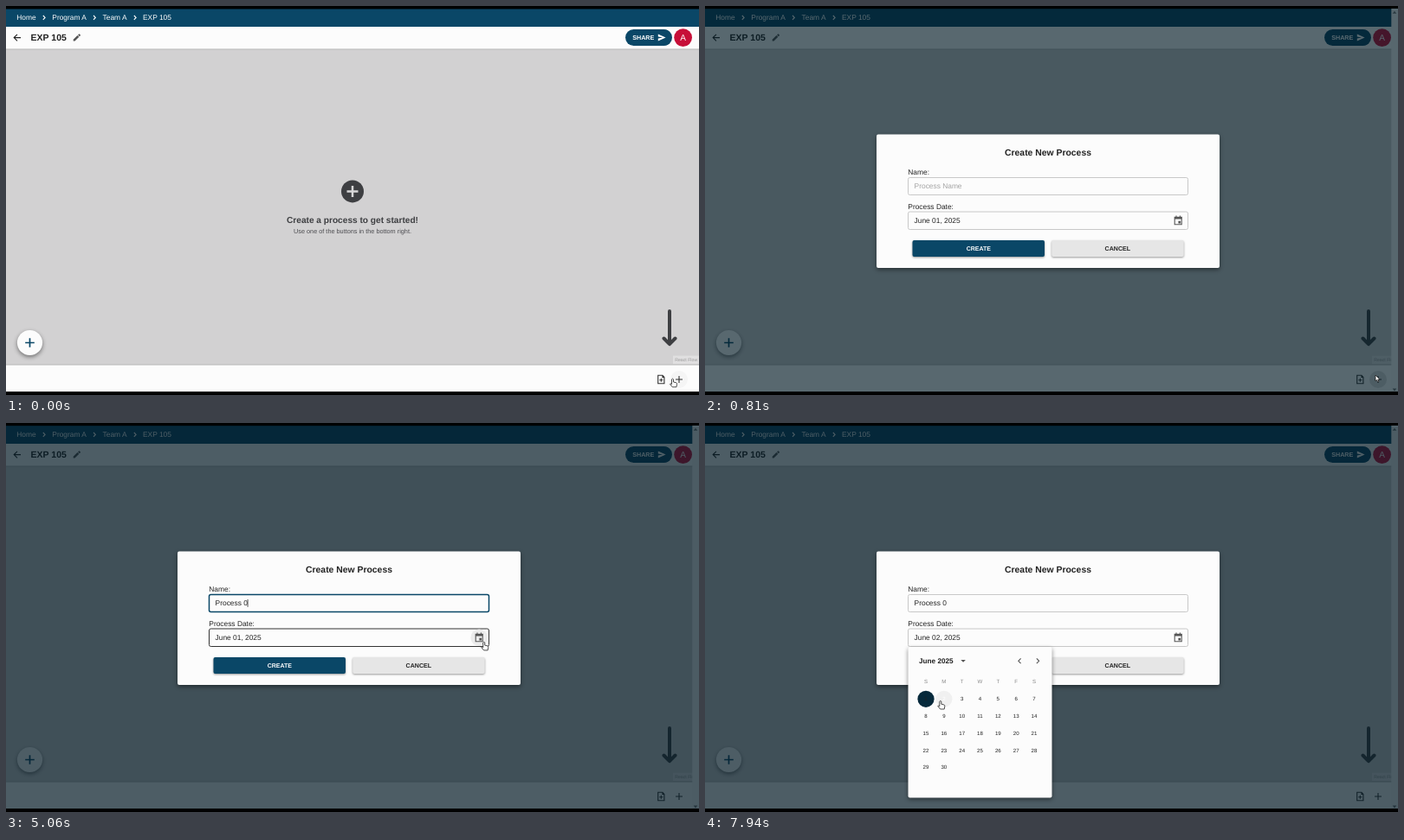
An HTML page that plays this animation: 800 by 450 pixels, repeating every 8000 ms.

```html
<!DOCTYPE html>
<html lang="en">
<head>
<meta charset="utf-8">
<title>Create process</title>
<style>
html, body { margin: 0; width: 100%; height: 100%; overflow: hidden; background: #000; }
svg { display: block; width: 800px; height: 450px; }
text { font-family: "Liberation Sans", Arial, sans-serif; font-size: 8.4px; fill: #222; text-rendering: geometricPrecision; white-space: pre; }
.b { font-weight: bold; }
.m { text-anchor: middle; }
.w { fill: #fff; }
.line { fill: none; stroke: #333; stroke-width: 1.1; }
.day { font-size: 6.1px; text-anchor: middle; }
.field { fill: none; stroke: #c8c8c8; }
.float { filter: drop-shadow(0 2px 2.5px #0007); }
.btn { filter: drop-shadow(0 1px .8px #0006); }
</style>
</head>
<body>
<svg viewBox="0 0 800 450">
  <rect width="800" height="450"/>
  <rect y="3.5" width="800" height="20.5" fill="#0a4767"/>
  <text class="w" x="12.3" y="16.3">Home</text>
  <text class="w" x="53.3" y="16.3">Program A</text>
  <text class="w" x="111.6" y="16.3">Team A</text>
  <text class="w" x="158" y="16.3">EXP 105</text>
  <path class="line" style="stroke:#fff" d="M42.8 11l2.3 2.4-2.3 2.4M101 11l2.3 2.4-2.3 2.4M147.8 11l2.3 2.4-2.3 2.4"/>

  <rect y="24" width="800" height="422" fill="#fcfcfc"/>
  <rect y="49.5" width="800" height="366" fill="#b9b9ba"/>
  <rect y="50.5" width="800" height="364" fill="#d2d1d2"/>
  <path class="line" style="stroke:#222" d="M17 36.6H9.3M13 32.8l-3.8 3.8 3.8 3.8"/>
  <text class="b" x="28.6" y="40.4" style="font-size:10.5px">EXP 105</text>
  <path fill="#555" d="M77.7 40.6v-1.8l4.8-4.8 1.8 1.8-4.8 4.8zM83.1 33.4l1-1q.4-.3.8 0l.9.9q.4.4 0 .9l-1 1z"/>
  <rect x="715" y="27" width="54" height="19" rx="9.5" fill="#0a4767"/>
  <text class="b w" x="723.2" y="39" style="font-size:7.2px">SHARE</text>
  <path class="w" d="M752.8 32.6l8.8 3.9-8.8 3.9v-3l5.4-.9-5.4-.9z"/>
  <circle cx="781.6" cy="36.6" r="10.4" fill="#c70f38"/>
  <text class="m w" x="781.6" y="40.2" style="font-size:10px">A</text>

  <circle cx="400" cy="214.4" r="13" fill="#3e3f42"/>
  <path d="M393.5 214.4h13M400 207.9v13" stroke="#d8d7d8" stroke-width="2.5"/>
  <text class="b m" x="400" y="250.5" style="font-size:10.13px;fill:#3e3f42">Create a process to get started!</text>
  <text class="m" x="400" y="262.5" style="font-size:7.3px;fill:#4c4c50">Use one of the buttons in the bottom right.</text>
  <path d="M766 353v38M759.5 384.5l6.5 6.7 6.5-6.7" fill="none" stroke="#3e3f42" stroke-width="4" stroke-linecap="round" stroke-linejoin="round"/>
  <circle class="float" cx="27.5" cy="389.5" r="14.6" fill="#fcfcfc"/>
  <path d="M22.2 389.5h10.6M27.5 384.2v10.6" stroke="#0a4767" stroke-width="1.7"/>
  <rect x="770" y="404.5" width="30" height="9.5" fill="#e0dfe0"/>
  <text x="772.2" y="411.2" style="font-size:5.2px;fill:#999">React Flow</text>

  <path class="line" d="M758 427.3h-5.3v9.4h7.2v-7.3zM758 427.3v2.1h2M756.3 430.8v4M754.3 432.8h4"/>
  <circle id="addHover" cx="777" cy="432" r="10"/>
  <path class="line" d="M773 432h8M777 428v8"/>

  <g id="bar">
    <rect x="792.3" y="3.5" width="7.7" height="442.5" fill="#fafafa"/>
    <path fill="#777" d="M793.7 8.8l2.3-3 2.3 3zM793.7 442.6l2.3 3 2.3-3z"/>
  </g>
  <rect id="scrim" y="3.5" width="800" height="442.5" fill="#031b26"/>

  <g id="dialog">
    <rect class="float" x="198" y="148.5" width="396" height="154.5" rx="2" fill="#fcfcfc"/>
    <text class="b m" x="396" y="173.4" style="font-size:10.4px">Create New Process</text>
    <text x="234.3" y="195">Name:</text>
    <rect id="nameBox" class="field" x="234.5" y="198.5" width="323" height="20" rx="2"/>
    <text id="name" x="241.6" y="211.4"></text>
    <path id="caret" d="M0 204v8.8" stroke="#222" stroke-width=".8"/>
    <text x="234.3" y="234.5">Process Date:</text>
    <rect id="dateBox" class="field" x="234.5" y="238" width="323" height="20.5" rx="2"/>
    <text id="date" x="241.6" y="251"></text>
    <circle id="iconHover" cx="546.2" cy="248.2" r="9.8" fill="#ececec"/>
    <path class="line" style="stroke:#555" d="M542.2 244.4h8v8.3h-8zM542 245.3h8.4M544 242.6v2M548.4 242.6v2"/>
    <path fill="#555" d="M542 244h8.4v2.6H542zM546.4 248.7h2.7v2.7h-2.7z"/>
    <rect class="btn" x="239.5" y="271" width="152.5" height="19" rx="2" fill="#0a4767"/>
    <text class="b m w" x="315.8" y="283" style="font-size:7px">CREATE</text>
    <rect class="btn" x="400.2" y="271" width="152.5" height="19" rx="2" fill="#e6e6e6"/>
    <text class="b m" x="476.4" y="283" style="font-size:7.1px">CANCEL</text>
  </g>

  <g id="picker">
    <rect class="float" x="234.5" y="259" width="166" height="174.5" rx="2" fill="#fcfcfc"/>
    <text class="b" x="247" y="278.3" style="font-size:8.2px">June 2025</text>
    <path fill="#555" d="M295.3 274h5.6l-2.8 2.8z"/>
    <path class="line" style="stroke:#555" d="M364.6 272.4l-2.8 2.9 2.8 2.9M382.8 272.4l2.8 2.9-2.8 2.9"/>
    <g id="days"></g>
  </g>

  <g id="cursor" stroke="#222" stroke-width=".8" stroke-linejoin="round">
    <path id="hand" fill="#fff" d="M-1 .9Q0-.6 1 .9V4l3.2.8Q5.2 5.2 5 6.4L4.4 9.8H-.2L-3 6.3q0-1.2 2 .2z"/>
    <path id="arrow" fill="#fff" d="M0 0v7l1.6-1.5 1.1 2.6 1.2-.5L2.8 5.1H5z"/>
    <path id="beam" fill="none" d="M-1.6-3.5Q0-3.6 0-3 0-3.6 1.6-3.5M0-3.2v6.4M-1.6 3.5Q0 3.6 0 3 0 3.6 1.6 3.5"/>
  </g>
</svg>
<script>
const LOOP = 8000, OPEN = 655, FOCUS = 1760, TYPE = 2350, KEY = 160, BLUR = 5880, PICK = 6080, CHOOSE = 7900;
const WORD = "Process 0";
const $ = id => document.getElementById(id);
const clamp = x => Math.min(1, Math.max(0, x));
const ease = x => x * x * (3 - 2 * x);
const show = (el, on) => { el.style.display = on ? "" : "none"; };
const set = (el, attrs) => { for (const k in attrs) el.setAttribute(k, attrs[k]); };
const inside = ([x, y], l, t, r, b) => x > l && x < r && y > t && y < b;

function add(tag, attrs, text = "") {
  const el = document.createElementNS("http://www.w3.org/2000/svg", tag);
  set(el, attrs);
  el.textContent = text;
  return $("days").appendChild(el);
}

const column = i => 255 + 20.83 * (i % 7);
[..."SMTWTFS"].forEach((s, i) =>
  add("text", { class: "day", x: column(i), y: 300.5, style: "fill:#888" }, s));
const days = Array.from({ length: 30 }, (_, i) => {
  const x = column(i), y = 319.3 + 19.7 * Math.floor(i / 7);
  return {
    x, y,
    disc: add("circle", { cx: x, cy: y, r: 9.6 }),
    label: add("text", { class: "day", x, y: y + 2.1 }, i + 1)
  };
});

// time, x, y of the pointer tip
const path = [
  [0, 769.5, 431], [350, 775, 431], [690, 775, 431], [810, 774, 427], [900, 774, 427],
  [1560, 427, 208], [4360, 427, 208], [5080, 552, 253.2], [6400, 552, 253.2],
  [7500, 271.8, 321.2], [LOOP, 271.8, 321.2]
];
function pointer(t) {
  const i = path.findIndex(p => p[0] > t), a = path[i - 1], b = path[i];
  const k = ease((t - a[0]) / (b[0] - a[0]));
  return [a[1] + (b[1] - a[1]) * k, a[2] + (b[2] - a[2]) * k];
}

function drawName(t, hover) {
  const focused = t >= FOCUS && t < BLUR;
  const count = Math.min(WORD.length, Math.max(0, Math.floor((t - TYPE) / KEY) + 1));
  $("name").textContent = count ? WORD.slice(0, count) : "Process Name";
  $("name").style.fill = count ? "#222" : "#a3a3a3";
  set($("nameBox"), { style: focused ? "stroke:#0a4767;stroke-width:1.5" : hover ? "stroke:#333" : "" });
  const since = count ? t - TYPE - (count - 1) * KEY : t - FOCUS;
  show($("caret"), focused && since % 1000 < 500);
  const end = count ? $("name").getSubStringLength(0, count) : 0;
  set($("caret"), { transform: `translate(${241.8 + end} 0)` });
}

function drawPicker(t, tip) {
  const k = 1 - (1 - clamp((t - PICK) / 250)) ** 3;
  show($("picker"), t >= PICK);
  set($("picker"), {
    opacity: k,
    transform: `translate(317.5 259) scale(${.75 + .25 * k} ${.56 + .44 * k}) translate(-317.5 -259)`
  });
  const chosen = t < CHOOSE ? 0 : 1;
  days.forEach((d, i) => {
    const hover = Math.hypot(tip[0] - d.x, tip[1] - d.y) < 9.6;
    set(d.disc, { fill: i === 0 ? "#06293b" : hover ? "#f0f0f0" : "none" });
    d.label.style.fill = i === chosen ? "#fff" : "#222";
  });
}

function draw(t) {
  const tip = pointer(t), open = t >= OPEN, picking = t >= PICK + 60;
  show($("bar"), open);
  show($("dialog"), open);
  set($("scrim"), { opacity: .7 * ease(clamp((t - OPEN + 5) / 190)) });
  show($("addHover"), t < 930);
  set($("addHover"), { fill: t < 500 ? "#f5f5f5" : "#dedede" });

  const onName = open && inside(tip, 234, 198, 558, 219);
  const onDate = open && inside(tip, 234, 238, 558, 259);
  const onIcon = onDate && tip[0] > 536;
  const onDays = picking && inside(tip, 244, 309, 390, 408);
  drawName(t, onName);
  set($("dateBox"), { style: onDate ? "stroke:#333" : "" });
  show($("iconHover"), onIcon);
  $("date").textContent = t < CHOOSE ? "June 01, 2025" : "June 02, 2025";
  drawPicker(t, tip);

  const kind = t < 740 || onIcon || onDays ? "hand" : onName || onDate ? "beam" : "arrow";
  for (const id of ["hand", "arrow", "beam"]) show($(id), id === kind);
  set($("cursor"), { transform: `translate(${tip})` });
}

function frame() {
  draw(performance.now() % LOOP);
  requestAnimationFrame(frame);
}
frame();
</script>
</body>
</html>
```
